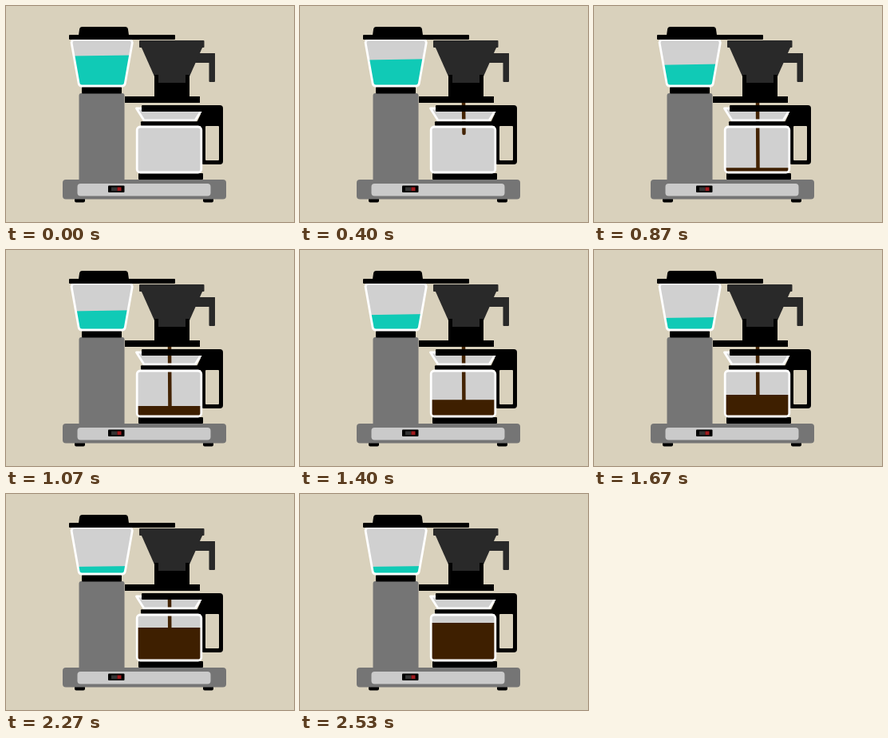
Animation, 361 px wide and 270 px high, one loop 2590 ms. Source, as an HTML page with a canvas:

```html
<!DOCTYPE html>
<html lang="en">
<head>
<meta charset="utf-8">
<title>Coffee maker</title>
<style>
html, body { margin: 0; width: 100%; height: 100%; overflow: hidden; background: #d9d1bc; }
canvas { display: block; width: 361px; height: 270px; }
</style>
</head>
<body>
<canvas id="stage"></canvas>
<script>
const W = 361, H = 270, LOOP = 2.59, FPS = 15;
const BLACK = '#000', GLASS = '#d0d0d0', WATER = '#10cab6', COFFEE = '#3e1f00', POUR = '#432303';
const STEEL = '#757575', PLATE = '#cacaca', FILTER = '#292929', BACK = '#d9d1bc';
const canvas = document.getElementById('stage');
const ctx = canvas.getContext('2d');
const scale = window.devicePixelRatio || 1;
canvas.width = W * scale;
canvas.height = H * scale;

// Motion in seconds: heights of the liquids and of a falling drop
const waterLevel = s => Math.min(90.5, 62 + 12 * s + 0.9 * s * s);
const coffeeLevel = s => Math.max(161 + 23.2 * (2.53 - s), 208 - 50 * Math.max(0, s - 0.75));
const fall = s => 114.3 + 116.7 * s;
const POUR_TIME = 2.13, JUG_FLOOR = 207;

function box(x0, y0, x1, y1, color, r = 0) {
  ctx.fillStyle = color;
  ctx.beginPath();
  ctx.roundRect(x0, y0, x1 - x0, y1 - y0, r);
  ctx.fill();
}

// Symmetric about cx, with all corners rounded by r
function trapezoid(cx, top, topHalf, bottom, bottomHalf, r = 0) {
  const path = new Path2D();
  path.moveTo(cx, top);
  path.arcTo(cx + topHalf, top, cx + bottomHalf, bottom, r);
  path.arcTo(cx + bottomHalf, bottom, cx, bottom, r);
  path.arcTo(cx - bottomHalf, bottom, cx - topHalf, top, r);
  path.arcTo(cx - topHalf, top, cx, top, r);
  path.closePath();
  return path;
}

function fill(path, color) {
  ctx.fillStyle = color;
  ctx.fill(path);
}

function outline(path) {
  ctx.strokeStyle = '#fff';
  ctx.lineWidth = 2.8;
  ctx.lineJoin = 'round';
  ctx.stroke(path);
}

// Liquid below a level inside a vessel; tilt raises the right end
function pool(vessel, cx, level, color, tilt = 0) {
  ctx.save();
  ctx.clip(vessel);
  ctx.translate(cx, level);
  ctx.transform(1, -tilt, 0, 1, 0, 0);
  box(-60, 0, 60, 60, color);
  ctx.restore();
}

const lid = trapezoid(122.5, 26, 30, 40, 32, 3);
const tank = trapezoid(120.2, 42, 38.8, 100, 28.5, 4);
const cone = trapezoid(208, 51, 38.5, 88, 22);
const spout = trapezoid(205, 128, 41.5, 143, 32);
const grip = trapezoid(254.5, 131, 8.5, 150, 17.5);
const jug = new Path2D();
jug.roundRect(164.2, 151, 80.6, 57, 4);

function drawBase() {
  for (const x of [86, 247]) box(x, 239, x + 13, 245.5, BLACK, 2);
  box(91.5, 109, 148.5, 222, STEEL, 3);
  box(71, 217, 276, 241.5, STEEL, 4);
  box(89.5, 222, 256.5, 237.5, PLATE, 4);
  box(128, 224.5, 148.5, 233, BLACK, 1);
  box(132, 226.5, 139.5, 231, '#333');
  box(139.5, 226.5, 144.5, 231, '#a01a1e');
  box(166, 209, 247, 217, BLACK, 1);
}

function drawTank(s) {
  box(95, 101, 145, 109.5, BLACK, 1);
  fill(tank, GLASS);
  pool(tank, 120, waterLevel(s), WATER, 0.015);
  outline(tank);
  box(79, 36, 212, 42, BLACK, 1);
  fill(lid, BLACK);
}

function drawFilter() {
  box(230, 59, 262, 71, FILTER, 1);
  box(254.5, 59, 262, 95, FILTER, 1);
  fill(cone, FILTER);
  box(167, 43, 248.5, 52, FILTER, 1);
  box(186, 86, 230, 115, BLACK);
  box(191, 86, 225, 96, FILTER);
}

function drawStream(s) {
  const tip = Math.min(JUG_FLOOR, fall(s)) - 2;
  const tail = Math.max(118, fall(s - POUR_TIME)) + 2;
  if (tip <= tail) return;
  ctx.strokeStyle = POUR;
  ctx.lineWidth = 4.5;
  ctx.lineCap = 'round';
  ctx.beginPath();
  ctx.moveTo(205, tail);
  ctx.lineTo(205.5, tip);
  ctx.stroke();
}

function drawPot(s) {
  box(244, 124, 272, 198, BLACK, 4);
  fill(grip, BLACK);
  box(250, 150, 267, 193, BACK, 1);
  fill(spout, GLASS);
  fill(jug, GLASS);
  drawStream(s);
  pool(jug, 205, coffeeLevel(s), COFFEE);
  outline(spout);
  box(170, 124, 268, 132, BLACK, 1);
  box(169, 144.3, 245, 150, BLACK, 1);
  outline(jug);
  box(149, 113, 243, 121, BLACK);
}

function frame() {
  const elapsed = performance.now() / 1000 % LOOP;
  const s = Math.floor((elapsed + 0.004) * FPS) / FPS;
  ctx.setTransform(scale, 0, 0, scale, 0, 0);
  box(0, 0, W, H, BACK);
  drawBase();
  drawTank(s);
  drawFilter();
  drawPot(s);
  requestAnimationFrame(frame);
}
frame();
</script>
</body>
</html>
```
